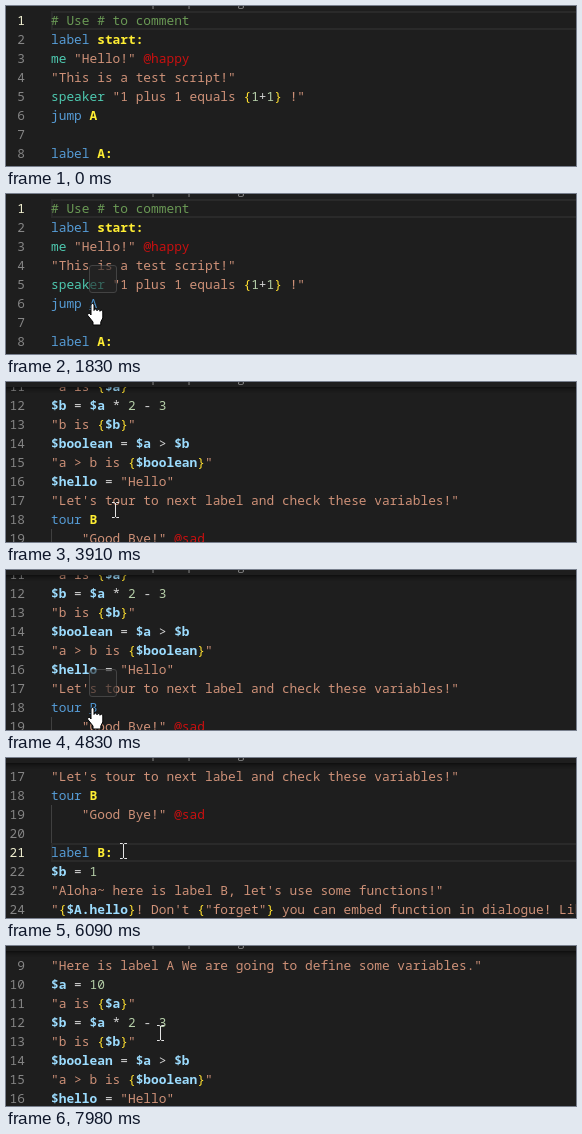
Animation of 570 by 160 pixels, one loop 8 s. Source, as an HTML page:

```html
<!DOCTYPE html>
<html lang="en">
<head>
<meta charset="utf-8">
<style>
  html, body { margin: 0; width: 100%; height: 100%; overflow: hidden; background: #1e1e1e; }
  #stage { position: relative; width: 570px; height: 160px; overflow: hidden; }
  #stage div, svg { position: absolute; }
  #crumbs { left: 122px; top: -13px; font: 12px/17px "Open Sans", sans-serif; color: #8a8a8a; white-space: pre; }
  #editor { left: 0; top: 5px; width: 570px; height: 155px; overflow: hidden; }
  #lines { left: 0; top: 0; width: 570px; font: 500 12.833px/19px "Noto Sans Mono", monospace; color: #d4d4d4; }
  .row { left: 0; width: 570px; height: 19px; white-space: pre; }
  .num { right: 551px; color: #858585; }
  .active .num { color: #f0efd0; }
  .text { left: 45px; width: 700px; height: 19px; }
  .active .text { box-shadow: inset 0 0 0 2px #2a2a2a; }
  .guide .text { box-shadow: inset 1px 0 #404040; }
  .comment { color: #6a9955; }
  .key { color: #569cd6; }
  .name { color: #ffee33; font-weight: bold; }
  .brace { color: #ffe030; }
  .who { color: #4ec9b0; }
  .str { color: #ce9178; }
  .var { color: #9cdcfe; font-weight: 600; }
  .digit { color: #b5cea8; }
  .plain { color: #d4d4d4; }
  .flag { color: #c81010; }
  .link { color: #4e94ce; font-weight: 500; text-decoration: underline; }
  #shadow { left: 0; top: 0; width: 570px; height: 6px; box-shadow: #000 0 6px 6px -6px inset; }
  #hover { left: 83px; width: 26px; height: 26px; border: 1px solid #5c5c5c; border-radius: 3px; background: #252526; }
  #beam, #hand { left: 0; top: 0; overflow: visible; }
</style>
</head>
<body>
<div id="stage">
  <div id="crumbs">samples &gt; plot &gt; ring</div>
  <div id="editor"><div id="lines"></div><div id="shadow"></div></div>
  <div id="hover"></div>
  <svg id="beam" width="8" height="16" fill="none" stroke="#e4e4e4">
    <path d="M0 .5H2.5L3.5 1.5L4.5 .5H7M3.5 1V15M0 15.5H2.5L3.5 14.5L4.5 15.5H7"/>
  </svg>
  <svg id="hand" width="17" height="23" fill="#fff" stroke="#000">
    <path d="M4 12V2a1.5 1.5 0 0 1 3 0v5.5a1.5 1.5 0 0 1 3 .3a1.5 1.5 0 0 1 3 .5a1.4 1.4 0 0 1 2.8.7V15l-2 4v3H6v-3L.8 12.5a1.5 1.5 0 0 1 2-2z"/>
  </svg>
</div>
<script>
const LOOP = 8000, ROW = 19, NAME_X = 86, HOVER_DELAY = 410;
const script = `# Use # to comment
label start:
me "Hello!" @happy
"This is a test script!"
speaker "1 plus 1 equals {1+1} !"
jump A

label A:
"Here is label A We are going to define some variables."
$a = 10
"a is {$a}"
$b = $a * 2 - 3
"b is {$b}"
$boolean = $a > $b
"a > b is {$boolean}"
$hello = "Hello"
"Let's tour to next label and check these variables!"
tour B
    "Good Bye!" @sad

label B:
$b = 1
"Aloha~ here is label B, let's use some functions!"
"{$A.hello}! Don't {"forget"} you can embed function in dialogue! Like"`.split("\n");

const $ = id => document.getElementById(id);
const clamp = (v, lo, hi) => Math.min(hi, Math.max(lo, v));
const span = (cls, text) => `<span class="${cls}">${text}</span>`;
const embed = (_, expr) => span("brace", "{") + span("plain", code(expr)) + span("brace", "}");

function code(text) {
  return text.replace(/("(?:{.*?}|[^"])*")|(\$[\w.]+)|(\d+)|(@\w+)|\w+/g, (word, str, name, digit, flag) =>
    str ? span("str", str.replace(/{(.*?)}/g, embed)) :
    span(name ? "var" : digit ? "digit" : flag ? "flag" : "who", word));
}

function highlight(line) {
  if (line[0] === "#") return span("comment", line);
  const jump = line.match(/^(label|jump|tour) (.*)/);
  return jump ? span("key", jump[1]) + " " + span("name", jump[2]) : code(line);
}

$("lines").innerHTML = script.map((line, i) =>
  `<div class="row${i === 18 || i === 19 ? " guide" : ""}" style="top:${i * ROW}px">` +
  `<div class="num">${i + 1}</div><div class="text">${highlight(line)}</div></div>`).join("");
const rows = [...document.querySelectorAll(".row")];

// Mouse wheel: one 50px notch every `gap` ms.
const notches = (t, start, count, gap) => clamp(Math.floor((t - start) / gap) + 1, 0, count);
const scrollAt = t => 50 * (notches(t, 2620, 1, 1) + notches(t, 2900, 3, 170) + notches(t, 5440, 2, 360))
  - 51 * notches(t, 7070, 3, 110);
const rowY = (line, t) => script.indexOf(line) * ROW + 14 - scrollAt(t);

// The pointer turns into a hand over a link; clicking it activates the label.
const links = [
  { line: "jump A", from: 1400, click: 2180 },
  { line: "tour B", from: 4400, click: 5000 },
  { line: "tour B", from: 6800, click: 7070 }
];
const labelRow = ({ line }) => script.indexOf(`label ${line.slice(-1)}:`);

const glide = (start, end, x, y) => ({ start, end, x, y });
const glideToLink = (start, end, line) => glide(start, end, NAME_X, rowY(line, end));
const glides = [
  glide(80, 790, 118, 114),
  glideToLink(890, 1510, "jump A"),
  glide(2200, 2580, 162, 116),
  glide(3470, 4230, 98, 131),
  glideToLink(4320, 4610, "tour B"),
  glide(5000, 5290, 126, 140),
  glide(5800, 6090, 117, 93),
  glide(6090, 6590, 97, 41),
  glideToLink(6610, 6930, "tour B"),
  glide(7440, 7980, 154, 87)
];

function pointerAt(t) {
  let x = 478, y = 170;
  for (const g of glides) {
    const u = clamp((t - g.start) / (g.end - g.start), 0, 1);
    const ease = 1 - (1 - u) ** 2;
    x += (g.x - x) * ease;
    y += (g.y - y) * ease;
  }
  return [Math.round(x), Math.round(y)];
}

function draw(now) {
  const t = now % LOOP, scroll = scrollAt(t);
  const link = links.find(l => t >= l.from && t < l.click);
  const clicked = links.filter(l => t >= l.click).pop();
  const active = clicked ? labelRow(clicked) : 0;
  const [x, y] = pointerAt(t);

  $("lines").style.top = -scroll + "px";
  $("shadow").hidden = !scroll;
  rows.forEach((row, i) => {
    row.classList.toggle("active", i === active);
    row.querySelector(".name")?.classList.toggle("link", link?.line === script[i]);
  });

  const shown = link ? t - link.from - HOVER_DELAY : -1;
  $("hover").style.opacity = shown < 0 ? 0 : Math.min(1, 0.5 + shown / 200);
  if (link) $("hover").style.top = rowY(link.line, t) - 2 * ROW + "px";

  $("hand").style.display = link ? "" : "none";
  $("beam").style.display = link ? "none" : "";
  $("hand").style.transform = `translate(${x - 5}px, ${y}px)`;
  $("beam").style.transform = `translate(${x - 3}px, ${y - 8}px)`;
  requestAnimationFrame(draw);
}
draw(performance.now());
</script>
</body>
</html>
```
